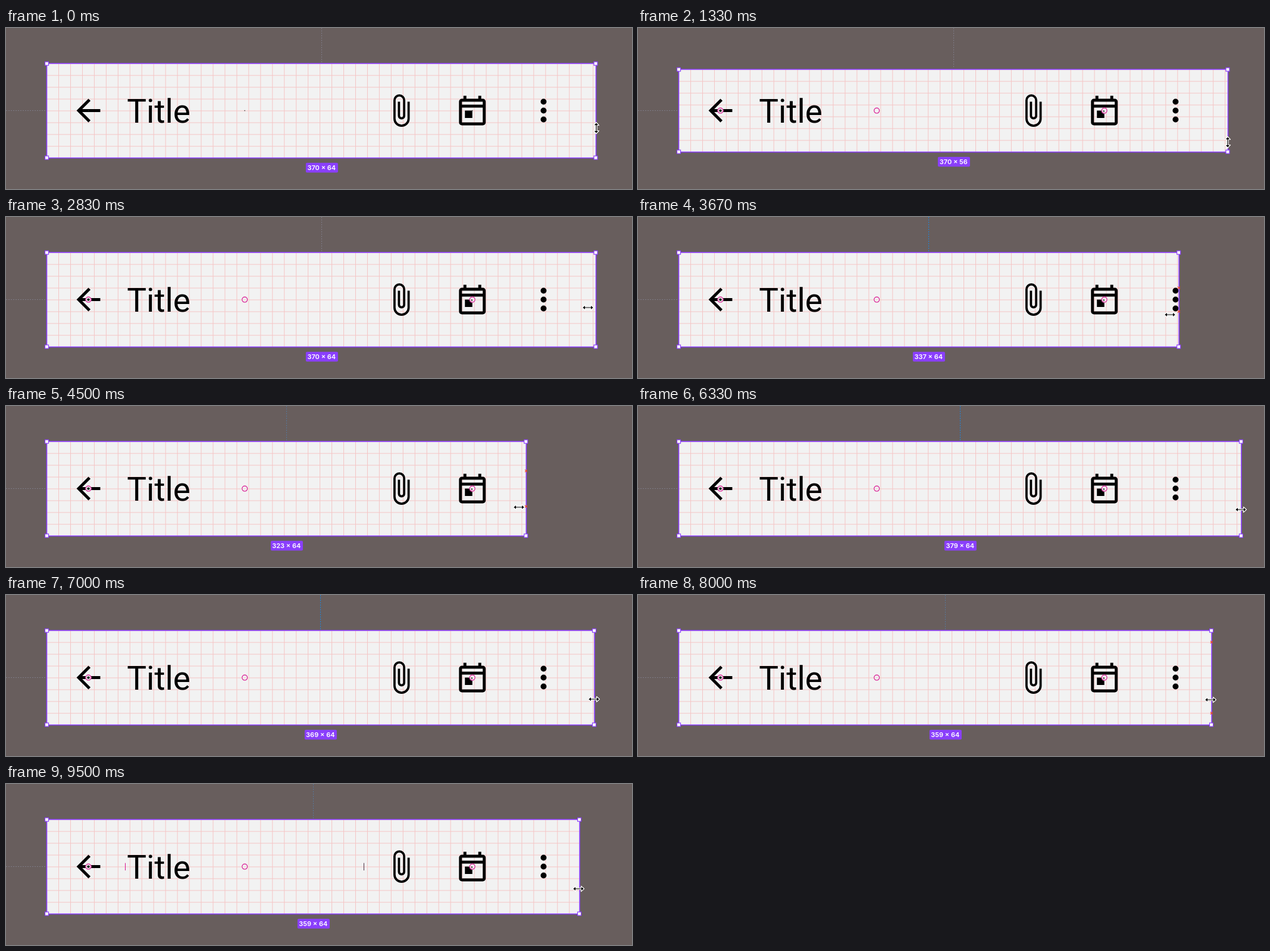
Recreate the animation shown at these times as an HTML page. Size 1052x272 px, loop 9670 ms.

```html
<!DOCTYPE html>
<html lang="en">
<head>
<meta charset="utf-8">
<title>Resizing an app bar</title>
<style>
  html, body { margin: 0; width: 100%; height: 100%; overflow: hidden; background: #685e5d; }
  svg { display: block; width: 1052px; height: 272px; }
  .title { font: 400 55px Roboto, sans-serif; }
  .size { font: 600 11px Inter, sans-serif; fill: #fff; text-anchor: middle; }
  .handle { fill: #fff; stroke: #8a3ffc; stroke-width: 1.2; }
  .guide { stroke-width: 1; stroke-dasharray: 2 2; }
  .ring { fill: none; stroke: #d9108f; stroke-width: 1.2; }
  .halo { fill: none; stroke: #f2f2f2; stroke-width: 3; }
  .cross { stroke: #f24822; stroke-width: 1.2; }
</style>
</head>
<body>
<svg viewBox="0 0 1052 272">
  <defs>
    <clipPath id="clip"><rect class="box"/></clipPath>
    <pattern id="grid" x="68.1" width="19.957" height="19.957" patternUnits="userSpaceOnUse">
      <path d="M0 .5H20M.5 0V20" stroke="#f00" stroke-opacity=".19"/>
    </pattern>
  </defs>

  <path id="guideV" class="guide"/>
  <path class="guide" d="M0 139.5H68" stroke="#7d7b86"/>

  <rect class="box" fill="#f2f2f2"/>
  <g clip-path="url(#clip)">
    <rect class="box" fill="url(#grid)"/>
    <g id="icons"></g>
    <text class="title" x="203.3" y="159.5">Title</text>
  </g>
  <rect class="box" fill="none" stroke="#8a3ffc" stroke-width="1.6"/>

  <g id="dots" fill="#333"></g>
  <g id="rings"></g>
  <g id="ticks">
    <path d="M200.5 133.5V146" stroke="#d9108f"/>
    <path d="M601.5 133.5V146" stroke="#4a3044"/>
  </g>
  <g id="crosses"></g>
  <g id="handles"></g>

  <g id="label">
    <rect x="-27" y="-8" width="54" height="16.5" rx="2" fill="#8a3ffc"/>
    <text class="size" x="-.6" y="4"></text>
  </g>

  <path id="cursor" d="M-9.5 0L-4.5 -4.5V-1.2H4.5V-4.5L9.5 0L4.5 4.5V1.2H-4.5V4.5Z"
    stroke="#fff" stroke-width="1.2" stroke-linejoin="round"/>
</svg>

<script>
const LOOP = 9670, SCALE = 2.4946, LEFT = 68.5, MID = 139.7;
const $ = id => document.getElementById(id);
const set = (el, attrs) => { for (const k in attrs) el.setAttribute(k, attrs[k]); };
const show = (el, on) => { el.style.display = on ? '' : 'none'; };

function add(parent, tag, attrs) {
  const el = document.createElementNS('http://www.w3.org/2000/svg', tag);
  set(el, attrs);
  return parent.appendChild(el);
}

// Icons on a 24-unit grid, placed by their centre.
const icons = [
  [138.5, 'M20 11H7.83l5.59-5.59L12 4l-8 8 8 8 1.41-1.41L7.83 13H20z'],
  [663.5, 'M16.5 6v11.5a4 4 0 0 1-8 0V5a2.5 2.5 0 0 1 5 0v10.5a1 1 0 0 1-2 0V6H10v9.5a2.5 2.5 0 0 0 5 0V5a4 4 0 0 0-8 0v12.5a5.5 5.5 0 0 0 11 0V6z'],
  [783.7, 'M19 4h-1V2h-2v2H8V2H6v2H5a2 2 0 0 0-2 2v14a2 2 0 0 0 2 2h14a2 2 0 0 0 2-2V6a2 2 0 0 0-2-2zm0 16H5V10h14zm0-12H5V6h14zM7 12h5v5H7z'],
  [903.4, [6, 12, 18].map(y => `M10 ${y}a2 2 0 0 1 4 0a2 2 0 0 1-4 0z`).join('')]
];
for (const [x, d] of icons) {
  add($('icons'), 'path', {
    d, 'fill-rule': 'evenodd',
    transform: `translate(${x} 139.5) scale(${SCALE}) translate(-12 -12)`
  });
}

for (const cx of [138.5, 401.2, 783.7]) {
  add($('dots'), 'circle', { cx, cy: 139.6, r: 0.8 });
  add($('rings'), 'circle', { cx, cy: 139.6, r: 3.7, class: 'halo' });
  add($('rings'), 'circle', { cx, cy: 139.6, r: 4.4, class: 'ring' });
}
const crosses = [0, 1].map(() => add($('crosses'), 'path', { class: 'cross', d: 'M-2-2L2 2M2-2L-2 2' }));
const handles = [0, 1, 2, 3].map(() => add($('handles'), 'rect', { class: 'handle', width: 6, height: 6 }));
const boxes = document.querySelectorAll('.box');
const size = document.querySelector('.size');

// step, width, height, cursor x, cursor y
const keys = [
  [0, 370, 64, 992, 169],
  [3, 370, 40, 992, 176],
  [6, 370, 40, 992, 180],
  [9, 370, 64, 990, 200],
  [11, 370, 64, 51, 52],
  [14, 370, 64, 984, 150],
  [17, 370, 64, 978, 153],
  [19, 370, 64, 976, 156],
  [21, 348, 64, 920, 163],
  [22, 337, 64, 894, 165],
  [25, 323, 64, 859, 170],
  [31, 323, 64, 868, 174],
  [32, 323, 64, 932, 176],
  [36, 379, 64, 1013, 175],
  [40, 379, 64, 1013, 175],
  [42, 369, 64, 988, 176],
  [45, 359, 64, 962, 177],
  [58, 359, 64, 962, 177]
];

// Width at which the right edge snaps -> half distance between the crosses.
const snaps = { 337: 20, 323: 30, 359: 60 };

function pose(step) {
  const i = keys.findIndex(k => k[0] > step);
  const a = keys[i - 1], b = keys[i];
  const p = (step - a[0]) / (b[0] - a[0]);
  return a.map((v, n) => Math.round(v + (b[n] - v) * p));
}

function guideColor(step, w) {
  if (step < 19) return '#7d7b86';
  return w === 323 || w === 359 ? '#56789c' : '#1b87e0';
}

function draw(step) {
  const [, w, h, cx, cy] = pose(step);
  const pw = w * SCALE, ph = h * SCALE;
  const right = LEFT + pw, top = MID - ph / 2, bottom = MID + ph / 2;
  const mid = Math.floor(LEFT + pw / 2) + 0.5;

  boxes.forEach(b => set(b, { x: LEFT, y: top, width: pw, height: ph }));
  set($('grid'), { y: top - 0.2 });
  set($('guideV'), { d: `M${mid} 0V${top - 2}`, stroke: guideColor(step, w) });
  handles.forEach((el, i) => set(el, {
    x: (i % 2 ? right - 0.5 : LEFT) - 3,
    y: (i < 2 ? top + 0.2 : bottom - 0.4) - 3
  }));

  set($('label'), { transform: `translate(${mid + 0.4} ${bottom + 16.2})` });
  size.textContent = `${w} × ${h}`;

  const half = step > 19 && step < 50 && snaps[w];
  show($('crosses'), half);
  if (half) crosses.forEach((el, i) =>
    set(el, { transform: `translate(${right - 0.2} ${MID + (i ? half : -half)})` }));

  show($('dots'), step === 0);
  show($('rings'), step > 0);
  show($('ticks'), step >= 52);
  set($('cursor'), { transform: `translate(${cx} ${cy}) rotate(${step < 10 ? 90 : 0})` });
}

// Six steps a second, each start rounded to 10 ms.
function stepAt(t) {
  const n = Math.floor((t + 4) * 0.006);
  return Math.round(n * 100 / 6) * 10 > t ? n - 1 : n;
}

const start = performance.now();
let last = -1;
function tick() {
  const step = stepAt((performance.now() - start) % LOOP);
  if (step !== last) draw(last = step);
  requestAnimationFrame(tick);
}
tick();
</script>
</body>
</html>
```
